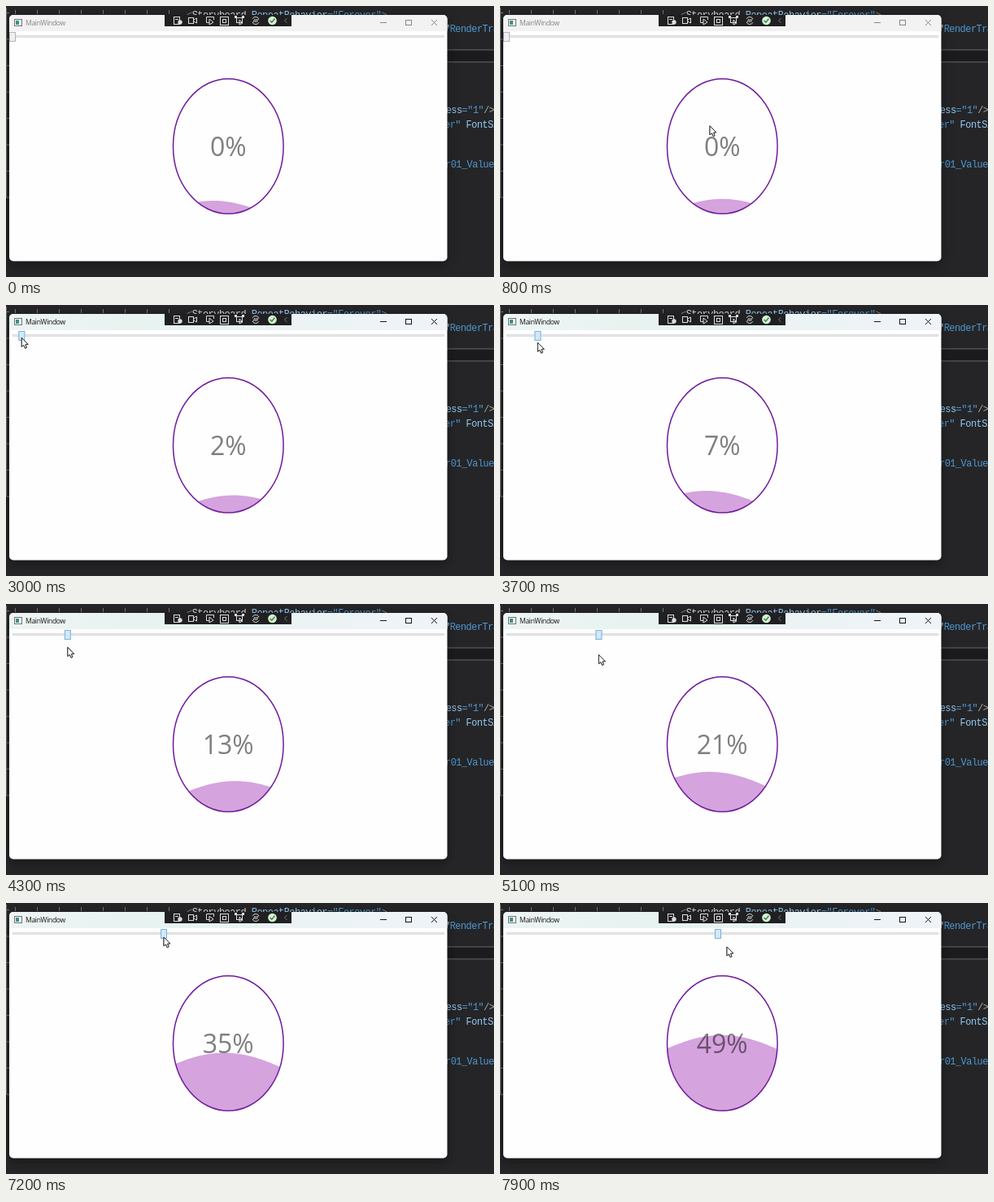
Write an HTML page with a canvas that moves like this. It is 600x334 px and loops after 8 s.

```html
<!DOCTYPE html>
<html lang="en">
<head>
<meta charset="utf-8">
<title>Wave progress</title>
<style>
html, body { margin: 0; width: 100%; height: 100%; overflow: hidden; background: #252527; }
canvas { display: block; width: 600px; height: 334px; }
</style>
</head>
<body>
<canvas id="stage" width="600" height="334"></canvas>
<script>
const ctx = document.getElementById('stage').getContext('2d');
const LOOP = 8000, STEP = 100;
const UI = '"Open Sans", "Noto Sans", sans-serif';
const MONO = '"Liberation Mono", "DejaVu Sans Mono", monospace';

// 0 before a, 1 after b, linear between
const ramp = (t, a, b) => Math.min(1, Math.max(0, (t - a) / (b - a)));
const smooth = u => u * u * (3 - 2 * u);

// The pointer enters, drags the thumb, lets go, comes back and drags again.
function pose(t) {
  const enter = ramp(t, 100, 1300), drag = ramp(t, 2500, 6200);
  const back = ramp(t, 6400, 6900), again = ramp(t, 7200, 7900);
  const thumb = 8 + 186 * drag ** 1.4 + 74 * again;
  return {
    thumb,
    x: thumb + 600 * (1 - enter) + 11 * again,
    y: 39 + 261 * (1 - enter) + 30 * smooth(drag) - 27 * back + 12 * again,
    shown: t >= STEP,
    hot: enter === 1 && drag < 1 || back === 1,
    active: t >= 2100
  };
}

function rect(x, y, w, h, fill) {
  ctx.fillStyle = fill;
  ctx.fillRect(x, y, w, h);
}

function box(x, y, w, h, stroke, fill) {
  if (fill) rect(x, y, w, h, fill);
  ctx.strokeStyle = stroke;
  ctx.strokeRect(x + 0.5, y + 0.5, w - 1, h - 1);
}

function round(x, y, w, h, radii, fill) {
  ctx.fillStyle = fill;
  ctx.beginPath();
  ctx.roundRect(x, y, w, h, radii);
  ctx.fill();
}

function disc(x, y, r, fill) {
  ctx.fillStyle = fill;
  ctx.beginPath();
  ctx.arc(x, y, r, 0, 7);
  ctx.fill();
}

function line(color, ...pts) {
  ctx.strokeStyle = color;
  ctx.beginPath();
  for (let i = 0; i < pts.length; i += 2) ctx.lineTo(pts[i], pts[i + 1]);
  ctx.stroke();
}

function text(str, x, y, font, color, align = 'left', spacing = '0px') {
  ctx.font = font;
  ctx.fillStyle = color;
  ctx.textAlign = align;
  ctx.letterSpacing = spacing;
  ctx.fillText(str, x, y);
}

// parts: alternating text and colour
function code(x, y, ...parts) {
  for (let i = 0; i < parts.length; i += 2) {
    text(parts[i], x, y, '12px ' + MONO, parts[i + 1], 'left', '-0.55px');
    x += ctx.measureText(parts[i]).width;
  }
}

function drawEditor() {
  const attr = '#92caf4', value = '#4f98d3', plain = '#c8c8c8', guide = '#77777a';
  rect(0, 0, 600, 334, '#252527');
  ctx.lineWidth = 1;
  for (let x = 11.5; x < 222; x += 27) line(guide, x, 5, x, 10);
  line(guide, 0.5, 2, 0.5, 236);
  for (let y = 8.5; y < 240; y += 32.5) line(guide, 0, y, 4, y);
  code(222, 15, '<', '#888', 'Storyboard ', '#dcdcdc', 'RepeatBehavior', attr, '="Forever"', value, '>', '#888');
  code(539, 32, '"', plain, 'RenderTransform', value);
  rect(541, 53, 59, 17, '#444448');
  rect(541, 55, 59, 13, '#1b1b1d');
  code(534, 132, 'ness', attr, '="1"', value, '/>', '#aaa');
  code(539, 150, 'er" ', value, 'FontSize', attr);
  code(540, 199, 'r01_ValueChanged', value);
}

function drawToolbar() {
  const c = '#dedede';
  rect(195, 11, 156, 14, '#202022');
  ctx.lineWidth = 1;
  // element list with gear
  box(206, 13, 8, 10, c);
  line(c, 208, 16.5, 212, 16.5);
  disc(214, 20, 2.7, c);
  // camera
  box(224, 14, 7, 8, c);
  line(c, 231, 17, 234.5, 15, 234.5, 21, 231, 19);
  // select element
  line(c, 250, 20.5, 246.5, 20.5, 246.5, 13.5, 255.5, 13.5, 255.5, 17);
  line(c, 250, 16, 250, 23, 255, 20, 250, 16);
  // layout adorners
  box(263, 13, 11, 11, c);
  box(266, 16, 5, 5, c);
  // track focus
  box(283, 14, 8, 7, c);
  for (const x of [281, 290]) rect(x, 12, 3, 3, c);
  line(c, 287, 17, 287, 23, 291, 21, 287, 17);
  // reload
  for (const side of [0, Math.PI]) {
    ctx.beginPath();
    ctx.arc(307, 18, 4.5, side + 0.5, side + 2.7);
    ctx.stroke();
  }
  for (const x of [304, 306, 308]) line(c, x, 20, x + 2, 16);
  // check
  disc(327.5, 18, 5.3, '#d9eed8');
  ctx.lineWidth = 1.5;
  line('#388a34', 324.7, 18, 326.8, 20.2, 330.4, 15.8);
  ctx.lineWidth = 1;
  line('#77777a', 345.5, 15, 342.5, 18, 345.5, 21);
}

function drawWindow(active) {
  ctx.save();
  ctx.shadowColor = 'rgba(0,0,0,.4)';
  ctx.shadowBlur = 14;
  ctx.shadowOffsetY = 4;
  round(4, 11, 538.5, 303.5, 5, '#fffeff');
  ctx.restore();

  let bar = '#f2f2f2';
  if (active) {
    bar = ctx.createLinearGradient(4, 0, 542, 0);
    bar.addColorStop(0, '#edf4f3');
    bar.addColorStop(0.35, '#e7f3f0');
    bar.addColorStop(1, '#eff3f8');
  }
  round(4, 11, 538.5, 20, [5, 5, 0, 0], bar);

  const ink = active ? '#151515' : '#858585';
  ctx.lineWidth = 1;
  box(10, 16, 10, 9, '#6b7376', '#f4f8f8');
  rect(12, 18, 4, 5, '#3f8f86');
  text('MainWindow', 24, 24, '8.6px ' + UI, ink, 'left', '-0.35px');
  line(ink, 460, 20.5, 468, 20.5);
  box(491, 17, 8, 7, ink);
  line(ink, 523, 17, 530, 24);
  line(ink, 530, 17, 523, 24);
}

function drawSlider(x, hot) {
  ctx.lineWidth = 1;
  box(8, 36, 531, 3, '#dcdcdc', '#e7eaea');
  box(x - 4, 32, 8, 12, hot ? '#7ab2dc' : '#b4b4b4', hot ? '#d3e8f7' : '#f0f0f0');
}

function drawGauge(t, percent) {
  const oval = () => {
    ctx.beginPath();
    ctx.ellipse(273.3, 172.9, 67.8, 83.2, 0, 0, 7);
  };
  // the crest drifts to and fro
  const phase = (t / 1260 + 0.04) % 1;
  const crest = 252 + 33 * (1 - Math.abs(1 - 2 * phase));
  const top = 237.8 - 1.53 * percent + 0.12 * Math.max(0, 273 - crest);

  ctx.save();
  oval();
  ctx.clip();
  ctx.fillStyle = '#d5a3dd';
  ctx.beginPath();
  ctx.moveTo(200, 262);
  for (let x = 200; x <= 346; x += 2) {
    ctx.lineTo(x, top + 33 * (1 - Math.cos((x - crest) * Math.PI / 200)));
  }
  ctx.lineTo(346, 262);
  ctx.fill();
  ctx.restore();

  ctx.lineWidth = 1.5;
  ctx.strokeStyle = '#701c9c';
  oval();
  ctx.stroke();
  text(Math.round(percent) + '%', 273.2, 185, '32px ' + UI, 'rgba(0,0,0,.5)', 'center');
}

function drawPointer(x, y) {
  ctx.save();
  ctx.translate(x, y);
  ctx.fillStyle = '#fff';
  ctx.lineWidth = 1;
  line('#333', 0, 0, 0, 11, 2.5, 9, 4.2, 12.8, 6, 12, 4.5, 8.3, 7.8, 8, 0, 0);
  ctx.fill();
  ctx.stroke();
  ctx.restore();
}

function draw(t) {
  const p = pose(t);
  drawEditor();
  drawWindow(p.active);
  drawToolbar();
  drawSlider(p.thumb, p.hot);
  drawGauge(t, (p.thumb - 8) / 5.3);
  if (p.shown) drawPointer(p.x, p.y);
}

let start;
function frame(now) {
  if (start === undefined) start = now;
  draw(Math.floor((now - start) % LOOP / STEP) * STEP);
  requestAnimationFrame(frame);
}
draw(0);
requestAnimationFrame(frame);
</script>
</body>
</html>
```
